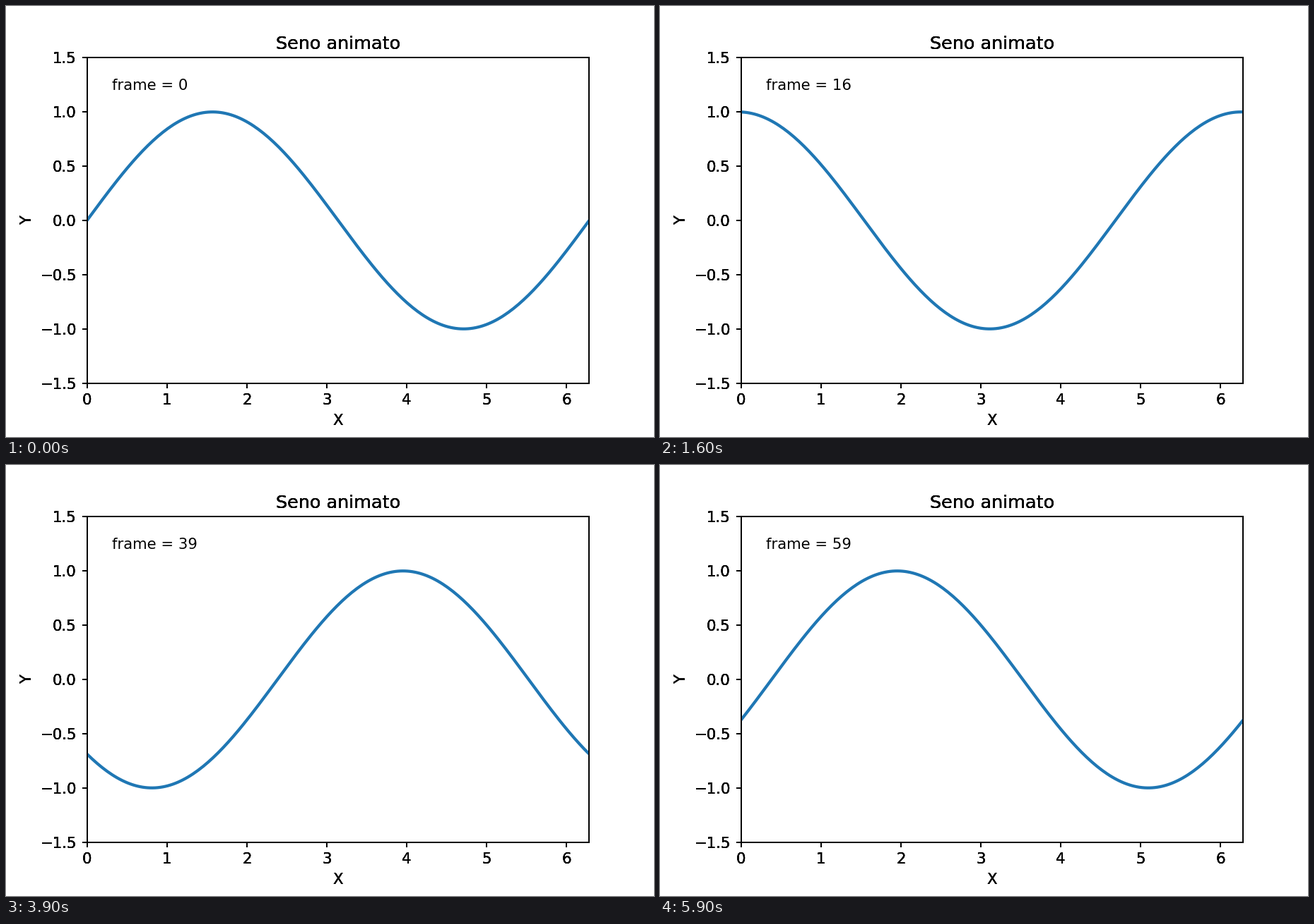
Animation of 917 by 611 pixels, one loop 6000 ms. Source, as a matplotlib script:

```python
import numpy as np
import matplotlib.pyplot as plt
from matplotlib.animation import FuncAnimation

WIDTH, HEIGHT, DPI = 917, 611, 152.75
FRAMES, INTERVAL = 60, 100
LAYERS = 4  # stacked axes give the labels their heavy edges

plt.rcParams.update({"font.family": "DejaVu Sans", "font.size": 10})

fig = plt.figure(figsize=(WIDTH / DPI, HEIGHT / DPI), dpi=DPI, facecolor="white")


def add_axes(filled):
    ax = fig.add_axes([0.125, 0.125, 0.775, 0.755], label=f"layer {len(fig.axes)}")
    ax.patch.set_visible(filled)
    ax.set(xlim=(0, 2 * np.pi), ylim=(-1.5, 1.5), xlabel="X", ylabel="Y")
    ax.set_title("Seno animato")
    return ax


for layer in range(LAYERS):
    ax = add_axes(filled=layer == 0)

x = np.linspace(0, 2 * np.pi, 200)
curve, = ax.plot(x, np.sin(x), color="#1f77b4", lw=2)
counter = ax.text(0.05, 0.9, "", transform=ax.transAxes)


def update(i):
    curve.set_ydata(np.sin(x + 0.1 * i))
    counter.set_text(f"frame = {i}")
    return curve, counter


anim = FuncAnimation(fig, update, frames=FRAMES, interval=INTERVAL,
                     init_func=lambda: update(0), repeat=True, repeat_delay=0)
plt.show()
```
